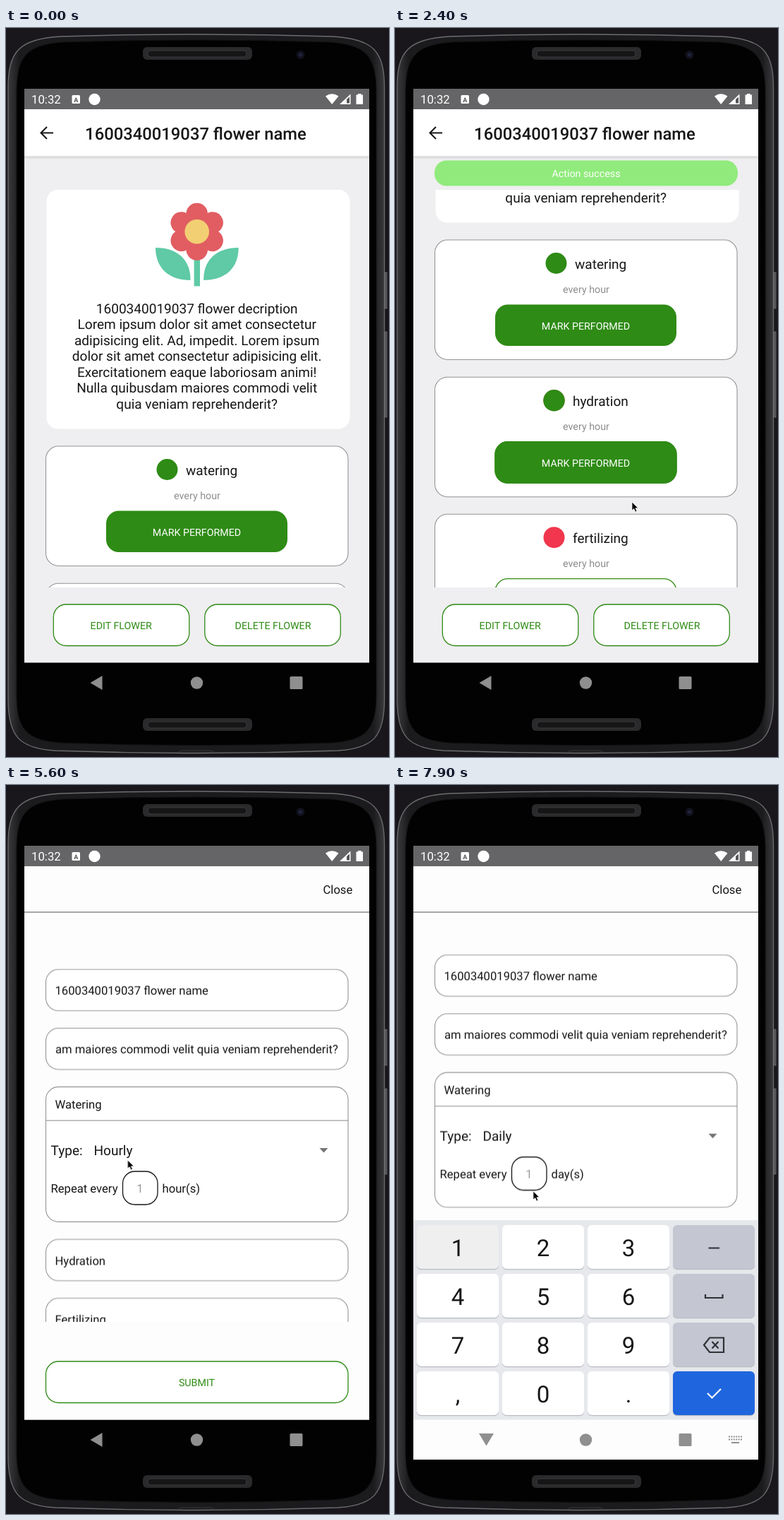
Recreate the animation shown at these times as an HTML page. Size 543 by 1032 pixels, loop 8 s.

```html
<!DOCTYPE html>
<html lang="en">
<head>
<meta charset="utf-8">
<title>Flower care app</title>
<style>
html, body { margin: 0; width: 100%; height: 100%; overflow: hidden; background: #19171b; }
svg { display: block; width: 543px; height: 1032px; font-family: Roboto, "Noto Sans", sans-serif; text-rendering: geometricPrecision; }
text { fill: #161616; }
.mid { text-anchor: middle; }
.body { font-size: 19.05px; }
.field { font-size: 16.65px; }
.small { font-size: 14.3px; fill: #8d8d8d; }
.cap { font-size: 14.25px; fill: #2e8b15; }
.white { fill: #fff; }
.box { fill: #fff; stroke: #949496; stroke-width: 1.1; }
.btn { fill: #fff; stroke: #2e8b15; stroke-width: 1.3; }
.on { fill: #2e8b15; }
.off { fill: #f1364d; }
.icon { fill: #8f8f8f; }
.num { font-size: 33px; }

/* 1% of the loop is 80 ms */
.scroll, .bar, .thumb, .done, .toast, .modal, .form, .tail, .closed, .open, .dim, .dialog, .ripple,
.hourly, .daily, .keys, .cursor, .ring { animation: 8s linear infinite both; }
.done, .closed, .open, .ripple, .hourly, .daily, .ring { animation-timing-function: step-end; }
.scroll { animation-name: scroll; }
.bar { animation-name: bar; }
.thumb { animation-name: thumb; }
.done { animation-name: done; }
.toast { animation-name: toast; }
.modal { animation-name: modal; }
.form { animation-name: form; }
.tail { animation-name: tail; }
.closed { animation-name: closed; }
.open { animation-name: open; }
.dim, .dialog { animation-name: dialog; }
.ripple { animation-name: ripple; }
.hourly { animation-name: hourly; }
.daily { animation-name: daily; }
.keys { animation-name: keys; }
.cursor { animation-name: cursor; }
.ring { animation-name: ring; }

@keyframes scroll {
  0%, 6% { transform: translateY(0); animation-timing-function: ease-in-out; }
  16.5%, 21% { transform: translateY(-219.3px); animation-timing-function: ease-out; }
  24.5%, 33% { transform: translateY(-292px); animation-timing-function: ease-in-out; }
  38.5%, 100% { transform: translateY(-358px); }
}
/* thumb travel is the scroll times viewport over content */
@keyframes thumb {
  0%, 6% { transform: translateY(0); animation-timing-function: ease-in-out; }
  16.5%, 21% { transform: translateY(134px); animation-timing-function: ease-out; }
  24.5%, 33% { transform: translateY(178px); animation-timing-function: ease-in-out; }
  38.5%, 100% { transform: translateY(219px); }
}
@keyframes bar {
  0%, 6% { opacity: 0; }
  7%, 25.5% { opacity: 1; }
  29%, 33% { opacity: 0; }
  34%, 41% { opacity: 1; }
  44%, 100% { opacity: 0; }
}
@keyframes done { 0% { opacity: 0; } 22.5%, 100% { opacity: 1; } }
@keyframes toast {
  0%, 23.5% { opacity: 0; }
  26%, 41% { opacity: 1; }
  44%, 100% { opacity: 0; }
}
@keyframes modal { 0%, 48.5% { opacity: 0; } 52.5%, 100% { opacity: 1; } }
@keyframes form {
  0%, 62.49% { transform: translateY(53.3px); }
  62.5%, 94% { transform: translateY(0); animation-timing-function: ease-out; }
  97%, 100% { transform: translateY(-20.4px); }
}
@keyframes tail { 0%, 62.49% { transform: translateY(-132.8px); } 62.5%, 100% { transform: none; } }
@keyframes closed { 0% { opacity: 1; } 62.5%, 100% { opacity: 0; } }
@keyframes open { 0% { opacity: 0; } 62.5%, 100% { opacity: 1; } }
@keyframes dialog {
  0%, 76% { opacity: 0; }
  78.5%, 86.5% { opacity: 1; }
  89%, 100% { opacity: 0; }
}
@keyframes ripple { 0% { opacity: 0; } 84% { opacity: 1; } 89%, 100% { opacity: 0; } }
@keyframes hourly { 0% { opacity: 1; } 87.5%, 100% { opacity: 0; } }
@keyframes daily { 0% { opacity: 0; } 87.5%, 100% { opacity: 1; } }
@keyframes keys {
  0%, 93.5% { transform: translateY(345px); animation-timing-function: ease-out; }
  97%, 100% { transform: none; }
}
@keyframes cursor {
  0%, 3% { transform: translate(560px, 720px); animation-timing-function: ease-out; }
  10% { transform: translate(410px, 690px); }
  17.5%, 20% { transform: translate(391.5px, 682px); animation-timing-function: ease-in-out; }
  26%, 37% { transform: translate(336px, 671px); animation-timing-function: ease-in-out; }
  45%, 52% { transform: translate(197.5px, 837px); animation-timing-function: ease-in-out; }
  60%, 63% { transform: translate(180px, 506px); animation-timing-function: ease-in-out; }
  68%, 71% { transform: translate(172.5px, 531px); }
  74%, 77% { transform: translate(168px, 519px); animation-timing-function: ease-in-out; }
  83%, 87% { transform: translate(83px, 506px); animation-timing-function: ease-in-out; }
  92%, 94% { transform: translate(192px, 569px); }
  97%, 100% { transform: translate(196px, 575px); }
}
@keyframes ring {
  0% { opacity: 0; } 18% { opacity: 1; } 19.9% { opacity: 0; }
  46.3% { opacity: 1; } 47.6% { opacity: 0; }
  61% { opacity: 1; } 62.4% { opacity: 0; }
  74.4% { opacity: 1; } 75.6% { opacity: 0; }
  83.2% { opacity: 1; } 84.9% { opacity: 0; }
  92.2% { opacity: 1; } 93.6%, 100% { opacity: 0; }
}
</style>
</head>
<body>
<svg viewBox="0 0 543 1032">
  <defs>
    <clipPath id="screen"><rect x="26" y="86" width="489" height="869"/></clipPath>
    <clipPath id="listArea"><rect x="50" y="229" width="445" height="562.5"/></clipPath>
    <clipPath id="formArea"><rect x="26" y="181" width="489" height="578.5"/></clipPath>
    <linearGradient id="shade" x2="0" y2="1">
      <stop stop-color="#cfcfd1"/><stop offset="1" stop-color="#efeef0"/>
    </linearGradient>
    <linearGradient id="rim">
      <stop stop-color="#39393b"/><stop offset=".03" stop-color="#1b1b1d"/>
      <stop offset=".97" stop-color="#1b1b1d"/><stop offset="1" stop-color="#39393b"/>
    </linearGradient>
    <filter id="drop" x="-10%" y="-10%" width="120%" height="130%">
      <feDropShadow dx="0" dy="6" stdDeviation="7" flood-opacity=".5"/>
    </filter>
    <g id="speaker">
      <rect x="194" y="27" width="155" height="18" rx="6" fill="#2a2a2c"/>
      <rect x="201" y="32" width="140" height="9" rx="4" fill="#161617" stroke="#3a3a3c"/>
    </g>
    <g id="task">
      <rect class="box" x="56.5" y="592" width="428.5" height="169.5" rx="18"/>
      <text class="small mid" x="271" y="667.3">every hour</text>
    </g>
    <rect id="mark" x="142" y="683.5" width="257" height="58.5" rx="18"/>
    <rect id="half" class="btn" x="67.3" y="816" width="192.5" height="58.5" rx="18"/>
    <rect id="input" class="box" x="56.5" y="261" width="428.5" height="58.5" rx="18"/>
    <circle id="petal" cx="270.7" cy="263" r="15.3"/>
    <path id="leaf" d="M212 311C244 311 262 329 261.500 357C231 357 212 340 212 311Z"/>
  </defs>

  <!-- phone body -->
  <rect width="543" height="1032" fill="#19171b"/>
  <path d="M537.500 346h2.500v51h-2.500zM537.500 430h2.500v121h-2.500z" fill="#4a4a4c" stroke="#77777a" stroke-width=".8"/>
  <path d="M3 85C3 34 18 15 78 12Q270 6 462 12C522 15 536.500 34 536.500 85V950C536.500 1002 522 1020 470 1023Q270 1030 70 1023C18 1020 3 1002 3 950Z" fill="url(#rim)" stroke="#6c6c6f" stroke-width="1.3"/>
  <path d="M15 95C15 42 26 24 82 20Q270 14 458 20C514 24 525 42 525 95V942C525 993 512 1008 462 1012Q270 1019 78 1012C28 1008 15 993 15 942Z" fill="#020202" stroke="#111113"/>
  <path d="M243 1026l6 -3h42l6 3" fill="none" stroke="#39393b"/>
  <use href="#speaker"/><use href="#speaker" y="950"/>
  <circle cx="417.500" cy="38" r="6" fill="#11121d"/><circle cx="417.500" cy="38" r="2.500" fill="#20243d"/>
  <g class="icon">
    <path d="M119.500 927L136.500 917V937Z"/><circle cx="270.500" cy="927" r="8.700"/>
    <rect x="402.500" y="918" width="18" height="18" rx="1.500"/>
  </g>

  <g clip-path="url(#screen)">
    <!-- flower page -->
    <rect x="26" y="115" width="489" height="783.500" fill="#efeef0"/>
    <rect x="26" y="181" width="489" height="5" fill="url(#shade)"/>
    <rect x="26" y="115" width="489" height="66.500" fill="#fff"/>
    <path d="M67 148.500H50M58 140L49.500 148.500L58 157" fill="none" stroke="#161616" stroke-width="2"/>
    <text class="mid" x="269" y="157.700" font-size="23.800" font-weight="500">1600340019037 flower name</text>
    <g clip-path="url(#listArea)">
      <g class="scroll">
        <rect x="57.500" y="229" width="430" height="338.500" rx="16" fill="#fff"/>
        <g fill="#5fcaa5">
          <rect x="266.600" y="320" width="8.400" height="45.500"/>
          <use href="#leaf"/><use href="#leaf" transform="matrix(-1 0 0 1 541.700 0)"/>
        </g>
        <g id="petals" fill="#e15d62"></g>
        <circle cx="270.700" cy="288.300" r="17.300" fill="#f2cf72"/>
        <g id="story" class="body mid"></g>

        <use href="#task"/>
        <circle class="on" cx="228.500" cy="625" r="15"/>
        <text class="body" x="255" y="632.500">watering</text>
        <use href="#mark" class="on"/>
        <text class="cap white mid" x="270.500" y="718.600">MARK PERFORMED</text>

        <g transform="translate(0 194.200)">
          <use href="#task"/>
          <circle class="off" cx="225.500" cy="625" r="15"/>
          <text class="body" x="252" y="632.500">hydration</text>
          <use href="#mark" class="btn"/>
          <text class="cap mid" x="270.500" y="718.600">MARK PERFORMED</text>
          <g class="done">
            <circle class="on" cx="225.500" cy="625" r="15.300"/>
            <use href="#mark" class="btn" style="fill:#2e8b15"/>
            <text class="cap white mid" x="270.500" y="718.600">MARK PERFORMED</text>
          </g>
        </g>

        <g transform="translate(0 388.200)">
          <use href="#task"/>
          <circle class="off" cx="225.500" cy="625" r="15"/>
          <text class="body" x="252" y="632.500">fertilizing</text>
          <use href="#mark" class="btn"/>
          <text class="cap mid" x="270.500" y="718.600">MARK PERFORMED</text>
        </g>
      </g>
      <g class="bar"><rect class="thumb" x="481" y="229" width="4.700" height="343" fill="#000" opacity=".34"/></g>
    </g>
    <use href="#half"/><use href="#half" x="214.500"/>
    <text class="cap mid" x="163.200" y="850.700">EDIT FLOWER</text>
    <text class="cap mid" x="378.500" y="850.700">DELETE FLOWER</text>
    <g class="toast">
      <rect x="56" y="187.500" width="430" height="36" rx="17" fill="#90eb7c"/>
      <text class="small white mid" x="271" y="211">Action success</text>
    </g>

    <!-- edit page -->
    <g class="modal">
      <rect x="26" y="115" width="489" height="783.500" fill="#fefdfe"/>
      <path d="M26 180H515" stroke="#88888a" stroke-width="1.300"/>
      <text class="field" x="449.500" y="153.800">Close</text>
      <g clip-path="url(#formArea)">
        <g class="form field">
          <use href="#input"/><text x="69.500" y="296.300">1600340019037 flower name</text>
          <use href="#input" y="83.200"/><text x="70" y="379.300">am maiores commodi velit quia veniam reprehenderit?</text>
          <g class="closed">
            <use href="#input" y="166.400"/><text x="69.500" y="463">Watering</text>
          </g>
          <g class="open">
            <rect class="box" x="56.500" y="427.400" width="428.500" height="191" rx="18"/>
            <path d="M56.500 475H485" stroke="#88888a" stroke-width="1.200"/>
            <text x="69.500" y="457.500">Watering</text>
            <text class="body" x="63.500" y="524.300">Type:</text>
            <path d="M444.500 514H456.500L450.500 520.500Z" fill="#757575"/>
            <text x="63.500" y="577">Repeat every</text>
            <rect x="165.500" y="547" width="49.500" height="47" rx="17" fill="#fff" stroke="#161616" stroke-width="1.300"/>
            <text class="mid" x="190" y="577" style="fill:#9a9a9a">1</text>
            <g class="hourly"><text class="body" x="124.500" y="524.300">Hourly</text><text x="221.500" y="577">hour(s)</text></g>
            <g class="daily"><text class="body" x="124.500" y="524.300">Daily</text><text x="221.500" y="577">day(s)</text></g>
          </g>
          <g class="tail">
            <use href="#input" y="382.300"/><text x="69.500" y="679.300">Hydration</text>
            <use href="#input" y="465.500"/><text x="69.500" y="762.500">Fertilizing</text>
          </g>
        </g>
      </g>
      <rect class="btn" x="56.500" y="816" width="428.500" height="58.500" rx="18"/>
      <text class="cap mid" x="270.500" y="850.700">SUBMIT</text>
    </g>

    <rect x="26" y="86" width="489" height="29" fill="#656466"/>
    <rect class="dim" x="26" y="86" width="489" height="812.500" fill="#000" fill-opacity=".64"/>
    <g class="dialog">
      <rect x="57.500" y="411.500" width="426.500" height="190.500" rx="2" fill="#fff" filter="url(#drop)"/>
      <rect class="ripple" x="145" y="478" width="255" height="57" fill="#f4f5f6"/>
      <g class="body">
        <text x="67.500" y="457.300">Hourly</text><text x="67.500" y="514.300">Daily</text><text x="67.500" y="571.300">Weekly</text>
      </g>
    </g>

    <!-- status icons -->
    <g fill="#fff">
      <text class="white" x="36" y="107" font-size="16.800">10:32</text>
      <rect x="93.500" y="95" width="11.500" height="12" rx="1.500"/>
      <text class="mid" x="99.300" y="104.500" font-size="9" font-weight="700" style="fill:#555">A</text>
      <circle cx="125.500" cy="101" r="8.200"/>
      <path d="M453 96.500Q462 90 471.500 96.500L462.200 108Z"/>
      <path d="M488.500 93.500V108H473Z"/><path d="M487 97.500V106.500H483V101Z" fill="#555"/>
      <path d="M499 94.500V93H503.500V94.500H506V108H496.500V94.500Z"/>
    </g>

    <!-- keypad -->
    <g class="keys">
      <rect x="26" y="616" width="489" height="283" fill="#e6e8ec"/>
      <rect x="26" y="898.500" width="489" height="57" fill="#fefdfe"/>
      <g id="pad"></g>
      <g fill="none" stroke="#303136" stroke-width="2.200">
        <path d="M444.500 655.500H460M440 721V726H464.500V721"/>
        <path d="M446 782.500H466V803H446L438 792.800ZM449.500 788L458.500 797.500M458.500 788L449.500 797.500"/>
        <path d="M443 861L449.500 867.500L462 855" stroke="#fff"/>
      </g>
      <g class="icon">
        <path d="M119 918H140L129.500 935.500Z"/><circle cx="270.500" cy="927" r="8.700"/>
        <rect x="402.500" y="918" width="18" height="18" rx="1.500"/>
        <path d="M473 922.500H492M473 926.500H492" stroke="#8f8f8f" stroke-width="2" stroke-dasharray="2 1.400"/>
        <rect x="477" y="930" width="11" height="2"/>
      </g>
    </g>
  </g>

  <g class="cursor">
    <circle class="ring" r="19.500" fill="none" stroke="#111" stroke-width="1.400"/>
    <path d="M0 0V12L2.800 9.500L4.700 14L6.800 13.100L5 8.700H8.700Z" fill="#000" stroke="#fff" stroke-width=".7"/>
  </g>
</svg>
<script>
const add = (parent, tag, attrs, label = "") => {
  const el = document.createElementNS("http://www.w3.org/2000/svg", tag);
  for (const [k, v] of Object.entries(attrs)) el.setAttribute(k, v);
  el.textContent = label;
  document.getElementById(parent).append(el);
};

for (let i = 0; i < 6; i++)
  add("petals", "use", { href: "#petal", transform: `rotate(${i * 60} 270.7 288.3)` });

[
  "1600340019037 flower decription",
  "Lorem ipsum dolor sit amet consectetur",
  "adipisicing elit. Ad, impedit. Lorem ipsum",
  "dolor sit amet consectetur adipisicing elit.",
  "Exercitationem eaque laboriosam animi!",
  "Nulla quibusdam maiores commodi velit",
  "quia veniam reprehenderit?"
].forEach((line, i) => add("story", "text", { x: 270.7, y: 403.8 + i * 22.45 }, line));

["123", "456", "789", ",0."].forEach((row, r) => {
  for (let c = 0; c < 4; c++) {
    const x = 31 + c * 121, y = 623 + r * 69;
    const fill = c < 3 ? (r + c ? "#fff" : "#efeff0") : r < 3 ? "#c4c7d1" : "#1f66de";
    const key = { x, width: 116, height: 62, rx: 6 };
    add("pad", "rect", { ...key, y: y + 1.3, fill: "#b9bcc3" });
    add("pad", "rect", { ...key, y, fill });
    if (c < 3) add("pad", "text", { class: "num mid", x: x + 58, y: y + 44 }, row[c]);
  }
});
</script>
</body>
</html>
```
